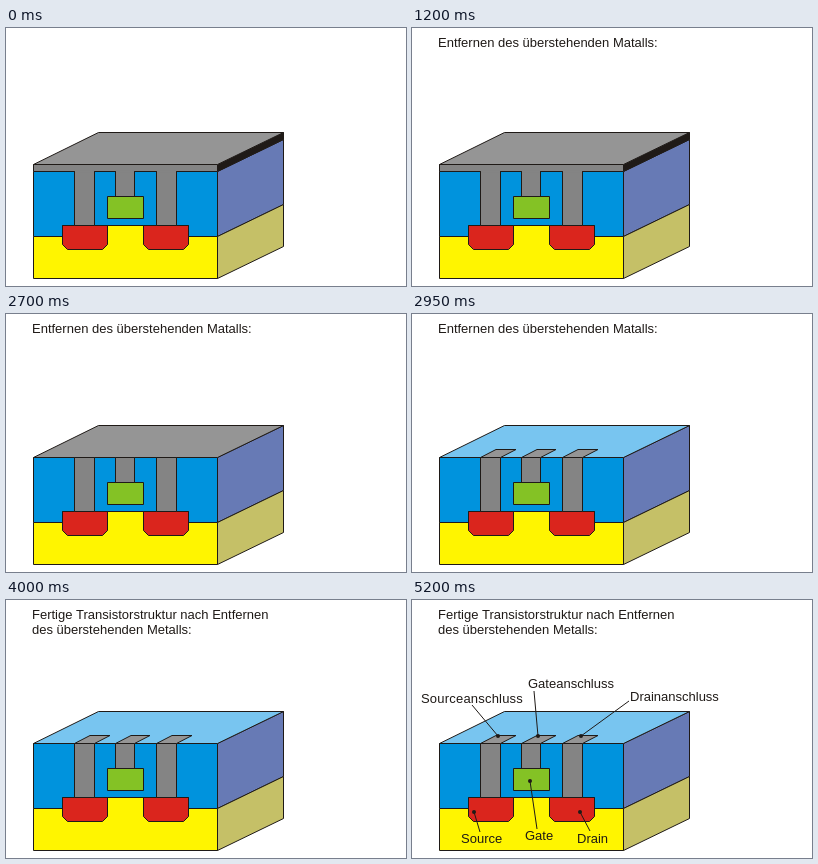
These frames come from a looping animation (400 px wide and 258 px high, 7200 ms). An HTML page with a canvas:

```html
<!DOCTYPE html>
<html lang="de">
<head>
<meta charset="utf-8">
<title>Transistorstruktur</title>
<style>
html, body { margin: 0; width: 400px; height: 258px; overflow: hidden; background: #fff; }
canvas { display: block; }
</style>
</head>
<body>
<canvas id="stage" width="400" height="258"></canvas>
<script>
const ctx = document.getElementById('stage').getContext('2d');
const LOOP = 7200;
const INK = '#1f1a17', BLUE = '#0093dd', YELLOW = '#fff500', RED = '#da251d',
  GREEN = '#84c225', METAL = '#848484', METAL_TOP = '#959595', OXIDE_TOP = '#78c5f0',
  SIDE_BLUE = '#677ab5', SIDE_OLIVE = '#c5c067';
const LEFT = 27.5, RIGHT = 211.5, BACK_L = 92.5, BACK_R = 277.5, RISE = 32;
const OXIDE = 143.5, SILICON = 208.5, BASE = 250.5;

// Plugs: left edge, right edge, bottom
const plugs = [[68.5, 88.5, 197.5], [109.5, 128.5, 168.5], [150.5, 170.5, 197.5]];

// Labels: text, x, baseline, line end at the text, dot, letter spacing
const labels = [
  ['Sourceanschluss', 9, 103, 60, 105, 86, 136, 0.2],
  ['Gateanschluss', 116, 88, 122, 91, 126, 136, 0],
  ['Drainanschluss', 218, 101, 217, 101, 169, 136, 0],
  ['Source', 49, 243, 68, 232, 62, 212, 0],
  ['Gate', 113, 240, 125, 229, 118, 181, 0],
  ['Drain', 165, 243, 178, 231, 168, 212, 0]
];

function poly(fill, ...pts) {
  ctx.beginPath();
  for (let i = 0; i < pts.length; i += 2) ctx.lineTo(pts[i], pts[i + 1]);
  ctx.closePath();
  ctx.fillStyle = fill;
  ctx.fill();
  ctx.stroke();
}

function box(fill, x1, y1, x2, y2) {
  poly(fill, x1, y1, x2, y1, x2, y2, x1, y2);
}

function side(fill, top, bottom) {
  poly(fill, RIGHT, top, BACK_R, top - RISE, BACK_R, bottom - RISE, RIGHT, bottom);
}

function lid(fill, y) {
  poly(fill, LEFT, y, BACK_L, y - RISE, BACK_R, y - RISE, RIGHT, y);
}

function well(x) {
  poly(RED, x, 197.5, x + 45, 197.5, x + 45, 216.5, x + 40, 221.5, x + 5, 221.5, x, 216.5);
}

function metalTop(t) {
  if (t < 2200) return 136.5;
  if (t < 2450) return 139.5;
  return t < 2700 ? 142.5 : OXIDE;
}

function drawBlock(t) {
  const top = metalTop(t), bare = t >= 2950;
  ctx.strokeStyle = INK;
  ctx.lineWidth = 1;
  side(SIDE_BLUE, OXIDE, SILICON);
  side(SIDE_OLIVE, SILICON, BASE);
  box(BLUE, LEFT, OXIDE, RIGHT, SILICON);
  poly(YELLOW, LEFT, SILICON, 56.5, SILICON, 56.5, 197.5, 182.5, 197.5,
    182.5, SILICON, RIGHT, SILICON, RIGHT, BASE, LEFT, BASE);
  well(56.5);
  well(137.5);
  if (top < OXIDE) {
    side(INK, top, OXIDE);
    box(METAL, LEFT, top, RIGHT, OXIDE);
  }
  lid(bare ? OXIDE_TOP : METAL_TOP, top);
  for (const [a, b, bottom] of plugs) {
    box(METAL, a, OXIDE, b, bottom);
    if (top < OXIDE - 1) {
      ctx.fillStyle = METAL;
      ctx.fillRect(a + 0.5, OXIDE - 1, b - a - 1, 2);
    }
    if (bare) poly(METAL_TOP, a, OXIDE, a + 15.5, 135.5, b + 15.5, 135.5, b, OXIDE);
  }
  box(GREEN, 101.5, 168.5, 137.5, 190.5);
}

// Number of 100 ms steps done since start
function steps(t, start) {
  return Math.max(0, Math.floor((t - start) / 100) + 1);
}

function rows(from, to, draw) {
  if (to <= from) return;
  ctx.save();
  ctx.beginPath();
  ctx.rect(0, from, 400, to - from);
  ctx.clip();
  draw();
  ctx.restore();
}

function write(text, x, y, spacing = 0) {
  ctx.font = '13px "Liberation Sans", Arial, sans-serif';
  ctx.letterSpacing = spacing + 'px';
  ctx.fillStyle = INK;
  ctx.fillText(text, x, y);
}

const edge = n => 8 + Math.round(4.4 * n);

function drawTitles(t) {
  const shown = Math.min(3, steps(t, 1000)), gone = Math.min(3, steps(t, 3200));
  rows(edge(gone), edge(shown), () =>
    write('Entfernen des überstehenden Matalls:', 26, 19));
  const n = steps(t, 3500);
  rows(0, n >= 6 ? 40 : n ? edge(n) : 0, () => {
    write('Fertige Transistorstruktur nach Entfernen', 26, 19);
    write('des überstehenden Metalls:', 26, 34);
  });
}

function drawLabels() {
  ctx.strokeStyle = INK;
  for (const [text, x, y, x1, y1, x2, y2, spacing] of labels) {
    write(text, x, y, spacing);
    ctx.beginPath();
    ctx.moveTo(x1, y1);
    ctx.lineTo(x2, y2);
    ctx.stroke();
    ctx.beginPath();
    ctx.arc(x2, y2, 2, 0, 2 * Math.PI);
    ctx.fill();
  }
}

function draw(t) {
  ctx.fillStyle = '#fff';
  ctx.fillRect(0, 0, 400, 258);
  drawBlock(t);
  drawTitles(t);
  const n = Math.min(3, steps(t, 5000));
  rows(78, 78 + 55.5 * n, drawLabels);
}

const start = performance.now();
function tick() {
  draw((performance.now() - start) % LOOP);
  requestAnimationFrame(tick);
}
tick();
</script>
</body>
</html>
```
